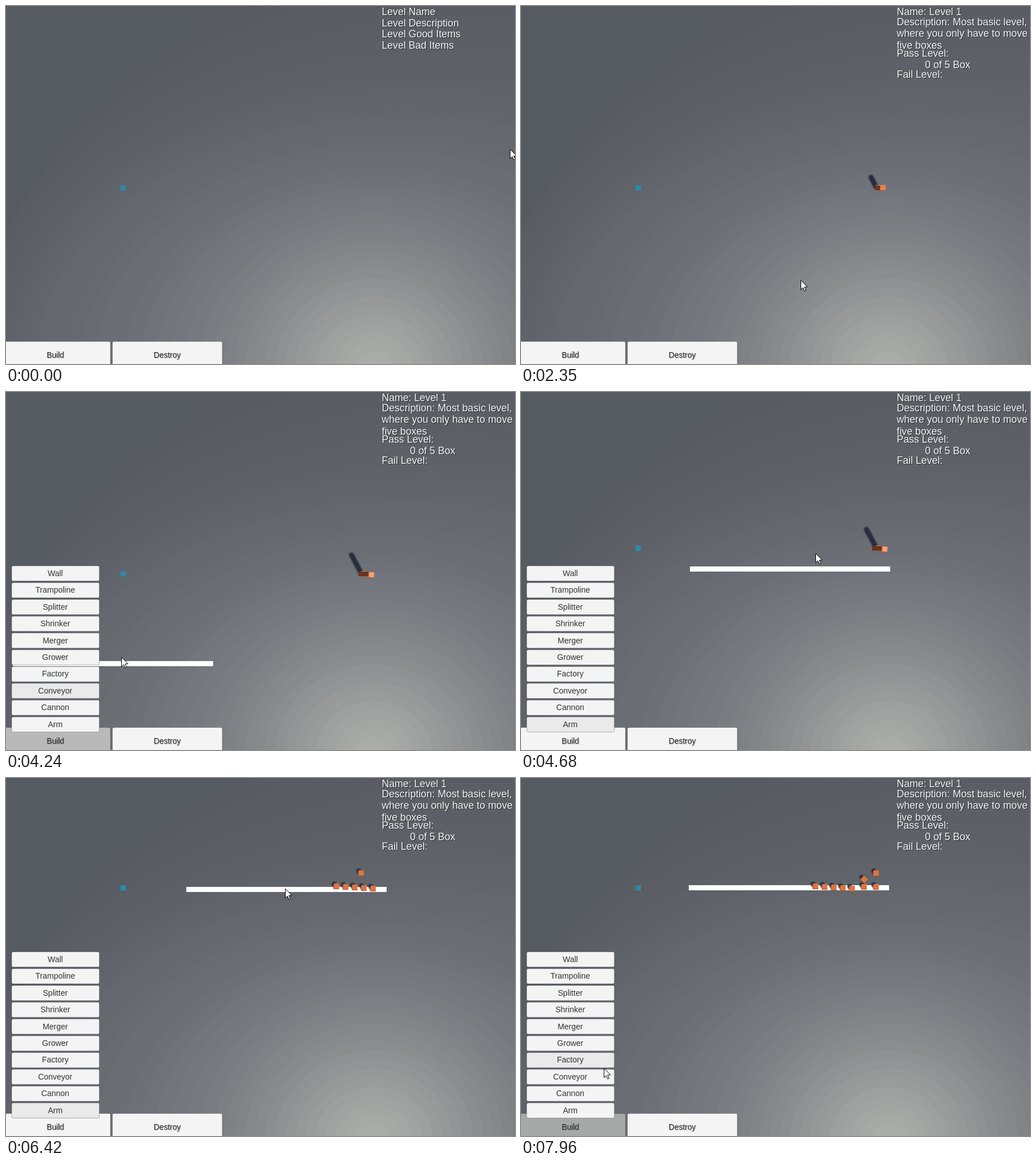
An HTML page with a canvas for the animation above (7.99 s loop, 892 by 628 pixels).

```html
<!DOCTYPE html>
<html>
<head>
<meta charset="utf-8">
<title>Box level</title>
<style>
html, body { margin: 0; width: 100%; height: 100%; overflow: hidden; background: #585c63; }
canvas { display: block; }
</style>
</head>
<body>
<canvas id="stage" width="892" height="628"></canvas>
<script>
const ctx = document.getElementById('stage').getContext('2d');
const LOOP = 7990, SPAWN = 513.3, BELT_START = 6420, BELT_SPEED = 0.041;
const LEVEL_START = 400, FIRST_BOX = 773, MENU_OPEN = 2760, PICKED = 3900, PLACED = 7230;
const FONT = '"Liberation Sans", Arial, sans-serif';
const MENU = ['Wall', 'Trampoline', 'Splitter', 'Shrinker', 'Merger',
  'Grower', 'Factory', 'Conveyor', 'Cannon', 'Arm'];

// Cursor stops: time, x, y
const CURSOR = [[0, 884, 252], [820, 790, 110], [1350, 644, 125], [1760, 790, 17],
  [2350, 493, 481], [2600, 106, 606], [2820, 106, 606], [3230, 118, 527], [3920, 130, 519],
  [4240, 202, 466], [4680, 517, 284], [5200, 513, 207], [6420, 490, 195], [7200, 470, 192],
  [7300, 470, 192], [7650, 108, 606], [7760, 108, 606], [7960, 146, 510]];

const clamp = (v, a = 0, b = 1) => Math.min(b, Math.max(a, v));
const mix = (a, b, p) => a + (b - a) * p;
const ramp = (t, a, b) => clamp((t - a) / (b - a));

function cursorAt(t) {
  const i = CURSOR.findIndex(stop => stop[0] > t);
  if (i < 0) return CURSOR[CURSOR.length - 1].slice(1);
  const [t0, x0, y0] = CURSOR[i - 1], [t1, x1, y1] = CURSOR[i], p = ramp(t, t0, t1);
  return [mix(x0, x1, p), mix(y0, y1, p)];
}

// Banded light: nested ellipses that widen and drift right as they grow
function background() {
  ctx.fillStyle = '#565b62';
  ctx.fillRect(0, 0, 892, 628);
  for (let r = 830; r > 0; r -= 16) {
    const red = 86 + 85 * Math.exp(-(((r - 8) / 285) ** 1.4));
    const green = red + 3, blue = red + 10 * ramp(r, 60, 330);
    const rx = r * (1.1 + .36 * ramp(r, 250, 450));
    const cx = 645 + .0017 * Math.max(0, r - 270) ** 2;
    ctx.fillStyle = `rgb(${red}, ${green}, ${blue})`;
    ctx.beginPath();
    ctx.ellipse(cx, 636, rx, r, 0, 0, 7);
    ctx.fill();
  }
}

function text(str, x, y, size, color, align, shade) {
  ctx.font = `${size}px ${FONT}`;
  ctx.textAlign = align;
  if (shade) {
    ctx.fillStyle = shade;
    ctx.fillText(str, x + 1, y + 1);
  }
  ctx.fillStyle = color;
  ctx.fillText(str, x, y);
}

function button(x, y, w, h, fill) {
  ctx.beginPath();
  ctx.roundRect(x, y, w, h, 2.5);
  ctx.fillStyle = fill;
  ctx.fill();
  ctx.strokeStyle = 'rgba(50, 52, 56, .35)';
  ctx.lineWidth = 1;
  ctx.stroke();
}

function shadow(x1, y1, x2, y2, width) {
  ctx.filter = 'blur(1.2px)';
  ctx.strokeStyle = '#272d3c';
  ctx.lineCap = 'round';
  ctx.lineWidth = width;
  ctx.beginPath();
  ctx.moveTo(x1, y1);
  ctx.lineTo(x2, y2);
  ctx.stroke();
  ctx.filter = 'none';
}

function cube(x, y, tilt = 0, top = '#dd743f') {
  ctx.save();
  ctx.translate(Math.round(x), Math.round(y));
  ctx.rotate(tilt);
  ctx.fillStyle = '#b0572e';
  ctx.fillRect(-5, -4, 10, 9);
  ctx.fillStyle = top;
  ctx.fillRect(-4, -5, 9, 9);
  ctx.restore();
}

// Boxes that pile up where they drop, before there is a belt
function pile(t, dy) {
  if (t < FIRST_BOX || t > 5450) return;
  const reach = 30 * Math.sqrt(ramp(t, 1650, 4240));
  shadow(622 - .55 * reach, 316 - reach + dy, 622, 317 + dy, 9);
  const age = (t - 260) % SPAWN;
  if (t < 1800 && age < 450) {
    const p = (age / 450) ** 2, x = mix(608, 620, p), y = mix(292, 315, p) + dy;
    shadow(x, y, x + 1, y + 2, 10);
  }
  const cx = 637 + 3 * Math.sin((t - 1350) * .0047), width = mix(3, 17, ramp(t, 1200, 4200));
  const picked = t > PICKED;
  if (t < 4700) {
    cube(626, 319 + dy, 0, '#e6814d');
    cube(cx, 319 + 2 * picked + dy, .15 * picked, picked ? '#f5a273' : '#e6814d');
  } else belt(t, dy);
  ctx.fillStyle = '#65341f';
  ctx.fillRect(cx - 5 - width, 315 + dy, width, 8);
}

// Boxes that leave the pile and ride the belt, then those dropped onto it
function belt(t, dy) {
  const boxes = [];
  const settle = ramp(t, 5200, 6000), rise = ramp(t, 4900, 5200);
  for (let i = 0; i < 5; i++) {
    const lift = i ** 3 * .45 * (1 - settle) * rise;
    boxes.push({
      x: Math.min(626 + 1.3 * i * i, 579 + 16 * i - BELT_SPEED * (t - BELT_START)),
      y: 190 + i * settle - lift + dy + 126,
      tilt: -lift / 90, sx: -4 - 1.8 * lift, sy: -4 - .95 * lift
    });
  }
  for (let k = 0; BELT_START + k * SPAWN <= t + 10; k++) {
    const age = t - BELT_START - k * SPAWN, fall = clamp(age / 450) ** 2;
    const wait = SPAWN * Math.max(1, 2 - k);
    const bounce = k % 2 * Math.sin(Math.PI * ramp(age, 780, 1270));
    boxes.push({
      x: 622 - BELT_SPEED * Math.max(0, age - wait),
      y: mix(167, 191, fall) - 13 * bounce,
      tilt: .7 * bounce, sx: -4, sy: -4
    });
  }
  for (const b of boxes) shadow(b.x + b.sx, b.y + b.sy, b.x + b.sx + 1, b.y + b.sy + 2, 8);
  for (const b of boxes) cube(b.x, b.y, b.tilt);
}

function conveyor(t) {
  if (t < PICKED) return;
  const [x, y] = t < PLACED ? cursorAt(t - 65) : [469.5, 192];
  ctx.fillStyle = '#fff';
  ctx.fillRect(Math.round(x - 175.5), Math.round(y - 4.5), 351, 9);
}

function info(t) {
  const line = (str, y, x = 658.5) => text(str, x, y, 17.64, '#f6f6f6', 'left', 'rgba(25, 27, 30, .75)');
  if (t < LEVEL_START) {
    ['Name', 'Description', 'Good Items', 'Bad Items']
      .forEach((word, i) => line('Level ' + word, 16 + 19.7 * i));
    return;
  }
  line('Name: Level 1', 16);
  ['Description: Most basic level,', 'where you only have to move', 'five boxes']
    .forEach((str, i) => line(str, 34 + 20.3 * i));
  line('Pass Level:', 89);
  line('0 of 5 Box', 109.3, 708);
  line('Fail Level:', 126);
}

function menu(t) {
  const white = '#f4f4f4', ink = '#323232', shade = 'rgba(50, 50, 50, .4)';
  const build = t > 7700 ? '#a7a9a9' : t > MENU_OPEN && t < 4560 ? '#b9b9b9' : white;
  button(-10, 588.5, 193, 45, build);
  button(186.5, 588.5, 192.5, 45, white);
  text('Build', 86.5, 617, 13.72, ink, 'center', shade);
  text('Destroy', 282.5, 617, 13.72, ink, 'center', shade);
  if (t < MENU_OPEN) return;
  const hot = t < 3150 ? '' : t < 4560 ? 'Conveyor' : t < 7650 ? 'Arm' : t > 7900 ? 'Factory' : '';
  MENU.forEach((name, i) => {
    const y = 305 + 29.44 * i;
    button(10, y, 153.5, 26.5, name === hot ? '#eaeaea' : white);
    text(name, 86.3, y + 17.8, 14, ink, 'center');
  });
}

function cursor(t) {
  const [x, y] = cursorAt(t);
  ctx.save();
  ctx.translate(Math.round(x) - .5, Math.round(y) - .5);
  ctx.beginPath();
  [[0, 0], [0, 16], [3.7, 12.7], [6.4, 18.5], [8.8, 17.4], [6.2, 11.6], [11, 11.3]]
    .forEach(([px, py]) => ctx.lineTo(px, py));
  ctx.closePath();
  ctx.fillStyle = '#fff';
  ctx.fill();
  ctx.strokeStyle = '#000';
  ctx.lineWidth = 1;
  ctx.stroke();
  ctx.restore();
}

function draw(now) {
  const t = now % LOOP, dy = -126 * ramp(t, 4460, 5080);
  background();
  ctx.fillStyle = '#2a8ba8';
  ctx.fillRect(200.5, 314.5 + dy, 9.5, 9);
  conveyor(t);
  pile(t, dy);
  if (t > 5450) belt(t, dy);
  info(t);
  menu(t);
  cursor(t);
}

const start = performance.now();
function loop() {
  draw(performance.now() - start);
  requestAnimationFrame(loop);
}
loop();
</script>
</body>
</html>
```
